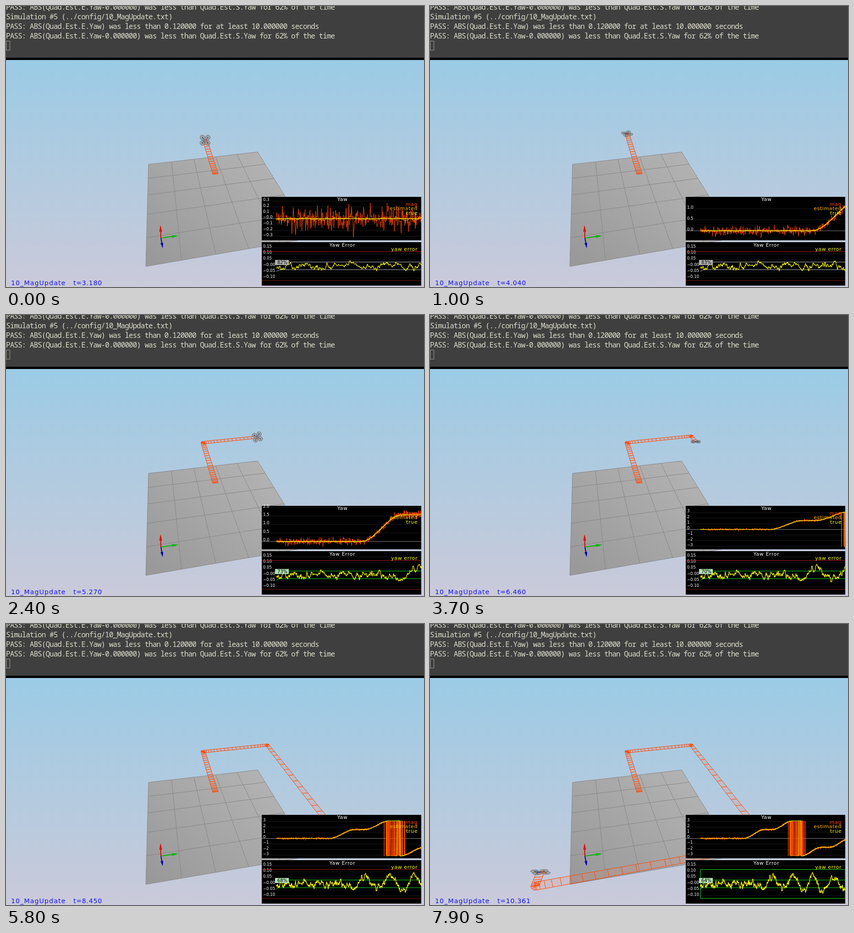
These frames come from a looping animation (912x614 px, 8000 ms). An HTML page with a canvas:

```html
<!DOCTYPE html>
<html lang="en">
<head>
<meta charset="utf-8">
<title>Yaw estimation simulator</title>
<style>
html, body { margin: 0; width: 100%; height: 100%; overflow: hidden; background: #000; }
canvas { display: block; width: 912px; height: 614px; }
</style>
</head>
<body>
<canvas id="stage" width="912" height="614"></canvas>
<script>
const ctx = document.getElementById('stage').getContext('2d');
const LOOP = 8000, DT = 0.01, PI = Math.PI;
const RED = '#ff4500', ORANGE = '#ffb000', YELLOW = '#ffff00', GREEN = '#14e614';
const PLOT_L = 590, PLOT_W = 316, LEG_TIME = 1.45;

// Loop time (ms), simulated time (s), share of errors within bounds (%)
const CLOCK = [[0, 3.18, 82], [1000, 4.04, 83], [2400, 5.27, 73], [4600, 7.28, 68],
  [5800, 8.45, 68], [7000, 9.53, 65], [7900, 10.36, 64]];

// Start time of each flight leg and the corner it starts from
const LEGS = [[2.1, 457, 367], [4.18, 430, 279], [6.25, 570, 264.5], [8.27, 740, 481],
  [9.9, 229, 573], [12, 279, 443]];

// The picture advances every 100 ms, halts, then about every 200 ms
const STEPS = [];
for (let ms = 0; ms <= 2400; ms += 100) STEPS.push(ms);
for (let ms = 3700; ms < LOOP; ms += [4300, 6000, 6700, 7200].includes(ms) ? 300 : 200) STEPS.push(ms);

const clamp = (v, lo = 0, hi = 1) => Math.min(hi, Math.max(lo, v));
const mix = (a, b, k) => a + (b - a) * k;
const smooth = u => (u = clamp(u), u * u * (3 - 2 * u));
const wrap = a => a > PI ? a - 2 * PI : a;

function clock(ms) {
  const i = clamp(CLOCK.findIndex(k => k[0] >= ms), 1, CLOCK.length - 1);
  const a = CLOCK[i - 1], b = CLOCK[i], k = (ms - a[0]) / (b[0] - a[0]);
  return { T: Math.round(mix(a[1], b[1], k) * 100) / 100, percent: Math.round(mix(a[2], b[2], k)) };
}

// Four quarter turns, one after another
const yawAt = t => [0, 1, 2, 3].reduce((sum, k) => sum + smooth((t - 3.1 - k * 2.05) / 1.45) * PI / 2, 0);

function flight(t) {
  const k = LEGS.findLastIndex(leg => leg[0] <= t);
  const [start, x0, y0] = LEGS[k], [next, x1, y1] = LEGS[k + 1];
  const u = clamp((t - start) / LEG_TIME), s = smooth(u);
  const turn = clamp((t - start - LEG_TIME) / (next - start - LEG_TIME));
  return { u, x: mix(x0, x1, s), y: mix(y0, y1, s), heading: (k + turn) * PI / 2 };
}

let seed = 20;
function random() {
  seed = (seed + 0x6D2B79F5) | 0;
  let r = Math.imul(seed ^ (seed >>> 15), 1 | seed);
  r = (r + Math.imul(r ^ (r >>> 7), 61 | r)) ^ r;
  return ((r ^ (r >>> 14)) >>> 0) / 4294967296;
}
const gauss = () => Math.sqrt(-2 * Math.log(1 - random())) * Math.cos(2 * PI * random());

const mag = [], est = [], truth = [], error = [];
for (let t = 0, drift = 0; t <= 10.4; t += DT) {
  const yaw = yawAt(t);
  drift = drift * .88 + gauss() * .009;
  const swing = mix(.01, .062, smooth((t - 4) / .9));
  const e = clamp(drift + swing * Math.cos(2 * PI * (t - 5.16) / 1.46), -.105, .105);
  error.push(e);
  truth.push(wrap(yaw));
  est.push(wrap(yaw + e));
  mag.push(wrap(yaw + clamp(gauss() * .1, -.33, .27)));
}

function text(str, x, y, font, color, spacing = 0, align = 'left', base = 'alphabetic') {
  ctx.font = font;
  ctx.letterSpacing = spacing + 'px';
  ctx.textAlign = align;
  ctx.textBaseline = base;
  ctx.fillStyle = color;
  ctx.fillText(str, x, y);
}
const sans = px => `${px}px "DejaVu Sans", sans-serif`;

function line(points, color, width = 1, fill) {
  ctx.beginPath();
  points.forEach(p => ctx.lineTo(p[0], p[1]));
  if (fill) { ctx.closePath(); ctx.fillStyle = fill; ctx.fill(); }
  if (color) { ctx.strokeStyle = color; ctx.lineWidth = width; ctx.stroke(); }
}
const level = (y, color) => line([[558, y], [906, y]], color);

function rect(x, y, w, h, color) {
  ctx.fillStyle = color;
  ctx.fillRect(x, y, w, h);
}

function frame(x, y, w, h, color) {
  ctx.strokeStyle = color;
  ctx.lineWidth = 1;
  ctx.strokeRect(x, y, w, h);
}

function disc(x, y, rx, ry, tilt, fill, stroke) {
  ctx.beginPath();
  ctx.ellipse(x, y, rx, ry, tilt, 0, 2 * PI);
  ctx.fillStyle = fill;
  ctx.fill();
  if (stroke) { ctx.strokeStyle = stroke; ctx.lineWidth = 1; ctx.stroke(); }
}

function drawTerminal() {
  rect(0, 0, 912, 113, '#3f3f3f');
  rect(0, 113, 912, 5, '#000');
  const share = 'PASS: ABS(Quad.Est.E.Yaw-0.000000) was less than Quad.Est.S.Yaw for 62% of the time';
  [share, 'Simulation #5 (../config/10_MagUpdate.txt)',
    'PASS: ABS(Quad.Est.E.Yaw) was less than 0.120000 for at least 10.000000 seconds', share]
    .forEach((s, i) => text(s, 0, 8 + i * 21, '16px "Noto Sans Mono", monospace', '#dcdccc', -.96));
  frame(.5, 76.5, 8, 20, '#a0a098');
}

// Perspective map of the unit square onto the floor
function floorPoint(u, v) {
  const g = .0673, h = -.3606, w = 1 + g * u + h * v;
  return [(311 + (238 + g * 549) * u + (-6 + h * 305) * v) / w,
    (346 + (-27 + g * 319) * u + (223 + h * 569) * v) / w];
}

function arrow(x, y, color) {
  const ox = 338, oy = 507, len = Math.hypot(x - ox, y - oy);
  const dx = (x - ox) / len, dy = (y - oy) / len, head = Math.min(14, len * .5);
  const bx = x - dx * head, by = y - dy * head;
  line([[ox, oy], [bx, by]], color, 2);
  line([[x, y], [bx - dy * 3, by + dx * 3], [bx + dy * 3, by - dx * 3]], null, 0, color);
}

function drawWorld() {
  const sky = ctx.createLinearGradient(0, 118, 0, 614);
  sky.addColorStop(0, '#9bcbe5');
  sky.addColorStop(1, '#cacada');
  rect(0, 118, 912, 496, sky);
  const slab = ctx.createLinearGradient(540, 320, 330, 570);
  slab.addColorStop(0, '#b2b2b2');
  slab.addColorStop(1, '#999999');
  line([[0, 0], [1, 0], [1, 1], [0, 1]].map(p => floorPoint(...p)), null, 0, slab);
  for (let i = 0; i <= 1; i += .2) {
    line([floorPoint(i, 0), floorPoint(i, 1)], '#868686');
    line([floorPoint(0, i), floorPoint(1, i)], '#868686');
  }
  arrow(342, 529, '#0000b8');
  arrow(376, 502, '#00b400');
  arrow(337, 479, '#e00000');
}

// Both ends of a rung, square to the heading and larger when nearer
function rung(t) {
  const { x, y, heading } = flight(t);
  const w = 4.5 + (y - 279) * .0165, depth = .6 + (y - 270) * .0011;
  const c = Math.cos(heading), s = Math.sin(heading);
  const hx = w * (c + .2 * s), hy = w * (depth * s - .1 * c);
  return [[x - hx, y - hy], [x + hx, y + hy]];
}

function drawTrail(T) {
  const rungs = [];
  for (let t = LEGS[0][0]; t < T; t += .06) rungs.push(rung(t));
  rungs.push(rung(T));
  rungs.slice(1).forEach(([l, r], i) =>
    line([rungs[i][0], l, r, rungs[i][1]], null, 0, 'rgba(255,120,90,.15)'));
  line(rungs.map(r => r[0]), RED);
  line(rungs.map(r => r[1]), RED);
  rungs.forEach(r => line(r, RED));
}

function drawDrone(T) {
  const { u, x, y, heading } = flight(T);
  const size = 8 + (y - 280) * .026, sway = Math.sin(2 * PI * u);
  const flat = clamp(.5 - .55 * sway, .22, 1), tilt = .3 * Math.sin(heading) * sway;
  const tip = (i, r) => {
    const a = yawAt(T) - PI / 4 + i * PI / 2;
    const dx = r * Math.cos(a), dy = r * flat * Math.sin(a);
    return [x + dx * Math.cos(tilt) - dy * Math.sin(tilt), y + dx * Math.sin(tilt) + dy * Math.cos(tilt)];
  };
  const r = size * .62, ry = r * Math.max(flat, .33);
  for (let i = 0; i < 4; i++) disc(...tip(i, size), r, ry, tilt, 'rgba(150,155,158,.7)', '#65686c');
  for (let i = 0; i < 4; i++) {
    line([[x, y], tip(i, size)], i < 2 ? '#e0501c' : '#505458', size / 8);
    disc(...tip(i, size), r * .22, ry * .22, tilt, '#202224');
  }
  line([0, 1, 2, 3, 4].map(i => tip(i, size * .28)), '#20307a', 1, '#dfe3ea');
}

function series(data, T, color, toY, width = 1) {
  const pts = [];
  for (let i = 0; i * DT <= T + 1e-6; i++) pts.push([PLOT_L + PLOT_W * i * DT / T, toY(data[i])]);
  ctx.lineJoin = 'bevel';
  line(pts, color, width);
}

const label = (s, y) => text(s.replace('-', '\u2212'), 561, y - 2.5, sans(8.5), '#fff', 0, 'left', 'middle');
const legend = (s, y, color) => text(s, 898, y, sans(11), color, .6, 'right', 'middle');
const heading = (s, y) => text(s, 734, y, sans(11), '#fff', .6, 'center', 'middle');

function drawYaw(T) {
  rect(558, 417, 348, 95, '#000');
  const hi = clamp(yawAt(T) + .15, .27, PI), lo = T > 6.25 ? -PI : -.33;
  const scale = 77 / (hi - lo), toY = v => 430 + (hi - v) * scale;
  const step = [.1, .2, .5, 1].find(s => 95 / scale / s <= 8);
  for (let n = -8; n <= 8; n++) {
    const v = n * step, y = toY(v);
    if (y < 420 || y > 510) continue;
    level(y, n ? '#1c1c1c' : '#888');
    label(step === 1 ? '' + n : n || step >= .5 ? v.toFixed(1) : '-0.0', y);
  }
  series(mag, T, RED, toY);
  series(est, T, ORANGE, toY);
  series(truth, T, YELLOW, toY, 1.2);
  heading('Yaw', 423);
  legend('mag', 434, RED);
  legend('estimated', 443, ORANGE);
  legend('true', 453, YELLOW);
}

function drawError(T, percent) {
  rect(558, 516, 348, 95, '#000');
  const toY = v => 567.8 - v * 262, good = percent <= 80;
  for (let n = -2; n <= 3; n++) {
    const y = toY(n * .05);
    level(y, '#1c1c1c');
    label(n ? (n * .05).toFixed(2) : '-0.00', y);
  }
  if (T > 10.3) {
    frame(590, 536.5, 316, 63, GREEN);
  } else {
    level(536.5, '#b41a1a');
    level(599.5, '#7c1c10');
  }
  for (const side of [1, -1]) {
    const pts = [];
    for (let x = 0; x <= PLOT_W; x++)
      pts.push([PLOT_L + x, toY(side * (.032 + .016 * Math.exp(-x * T / PLOT_W / .04)))]);
    line(pts, good ? GREEN : '#c4c4c4');
  }
  series(error, T, YELLOW, toY, 1.2);
  rect(587, 555, 30, 11, good ? '#b2e2b2' : '#b4b4b4');
  text(percent + '%', 603, 561, sans(10), '#000', 0, 'center', 'middle');
  heading('Yaw Error', 523);
  legend('yaw error', 532, YELLOW);
}

function draw(now) {
  const { T, percent } = clock(STEPS.findLast(s => s <= now % LOOP));
  drawWorld();
  drawTrail(T);
  drawDrone(T);
  drawYaw(T);
  drawError(T, percent);
  drawTerminal();
  text('10_MagUpdate', 11, 610, sans(14), '#1414e6', 1.2);
  text('t=' + (T > 10 ? T + .001 : T).toFixed(3), 147, 610, sans(14), '#1414e6', .8);
}

const start = performance.now();
function tick() {
  draw(Math.max(0, performance.now() - start));
  requestAnimationFrame(tick);
}
tick();
</script>
</body>
</html>
```
